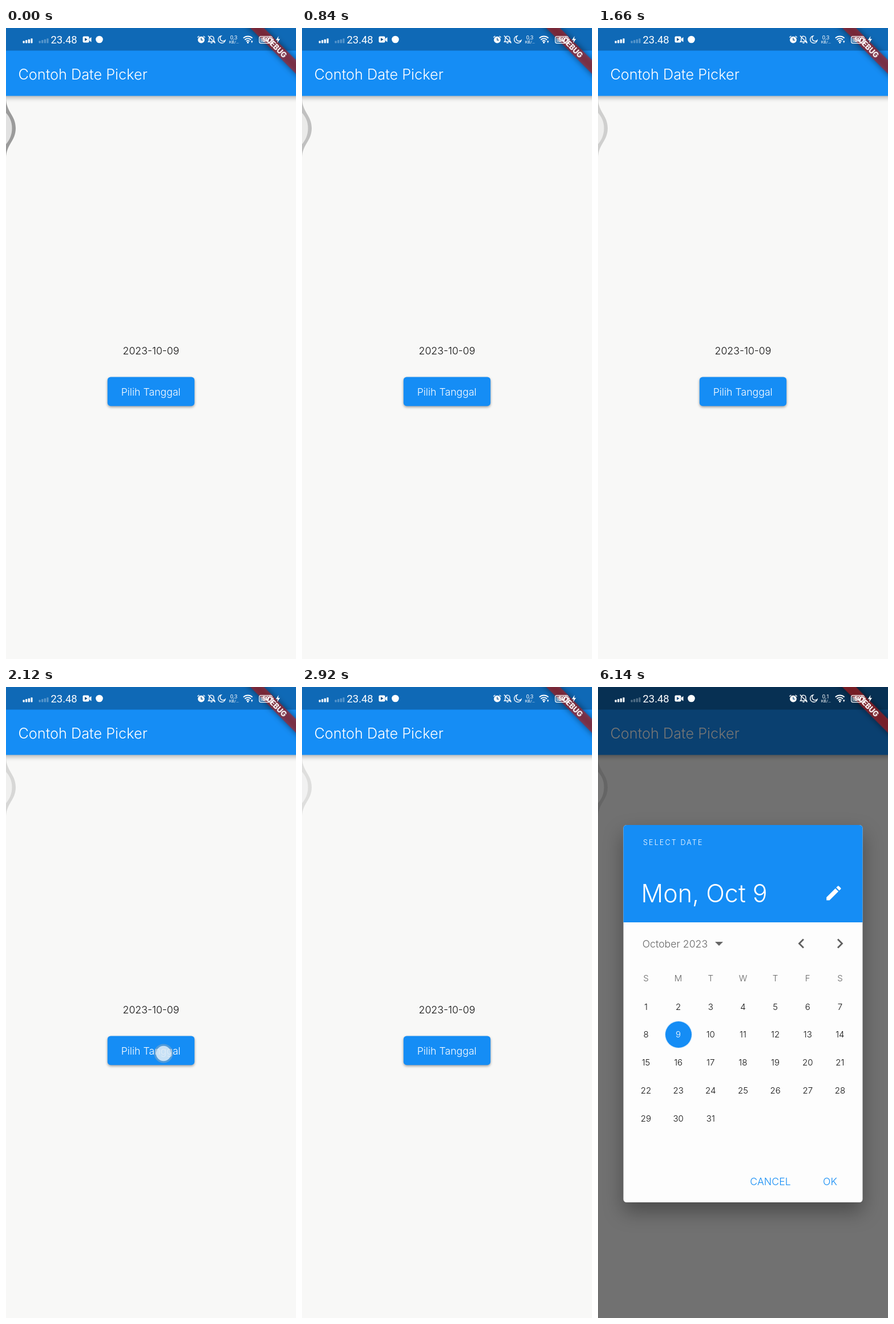
Recreate the animation shown at these times as an HTML page. Size 508 by 1102 pixels, loop 8 s.

```html
<!DOCTYPE html>
<html lang="id">
<head>
<meta charset="utf-8">
<title>Contoh Date Picker</title>
<style>
  html, body { margin: 0; width: 100%; height: 100%; overflow: hidden; background: #f8f8f7; }
  svg { display: block; width: 100vw; height: 100vh; }
  text { font-family: Inter, Roboto, sans-serif; font-weight: 350; font-optical-sizing: none; }
  .status text { font-family: Roboto, sans-serif; font-weight: 400; }
  .status .level { font-weight: 600; }
  .ribbon text { font-weight: 800; }
  .mid { text-anchor: middle; }
  .blue { fill: #158df5; }
  .grey { fill: #666; }
  .button { filter: drop-shadow(0 2px 2px rgba(0, 0, 0, .36)); }
  .bar { filter: drop-shadow(0 3px 4px rgba(0, 0, 0, .3)); }
  .card { filter: drop-shadow(0 16px 17px rgba(0, 0, 0, .34)); }
  .glow { filter: blur(5.6px); }

  .wave { animation: fade 8s linear infinite; }
  .touch { animation: tap 8s step-end infinite; }
  .dialog, .scrim { animation: open 8s step-end infinite; }
  .fast { animation: fast 8s step-end infinite; }
  .slow { animation: slow 8s step-end infinite; }

  @keyframes fade {
    0% { opacity: .37; }
    5.5% { opacity: .25; }
    15.5% { opacity: .19; }
    26.5% { opacity: .13; }
    36.5%, 100% { opacity: .1; }
  }
  @keyframes tap {
    0%, 100% { opacity: 0; }
    21% { opacity: 1; }
    28.5% { opacity: 0; }
  }
  @keyframes open {
    0% { opacity: 0; }
    71.75%, 100% { opacity: 1; }
  }
  @keyframes fast {
    0% { opacity: 1; }
    76.75%, 100% { opacity: 0; }
  }
  @keyframes slow {
    0% { opacity: 0; }
    76.75%, 100% { opacity: 1; }
  }
</style>
</head>
<body>
<svg viewBox="0 0 508 1102" preserveAspectRatio="none">
  <rect width="508" height="1102" fill="#f8f8f7"/>

  <!-- Page -->
  <rect class="blue bar" x="-12" y="0" width="532" height="118.6"/>
  <rect width="508" height="39.5" fill="#0f69b6"/>
  <text x="21.4" y="89.5" font-size="25.3" fill="#fff">Contoh Date Picker</text>
  <text class="mid" x="254" y="569.5" font-size="17.7" fill="#111">2023-10-09</text>
  <rect class="blue button" x="177.8" y="609.4" width="152.4" height="50.8" rx="5.6"/>
  <text class="mid" x="253.7" y="642" font-size="17.7" fill="#fff">Pilih Tanggal</text>

  <rect class="scrim" width="508" height="1102" fill="#000" fill-opacity=".54"/>

  <!-- Date picker -->
  <g class="dialog">
    <rect class="card" x="44.5" y="241" width="419" height="659" rx="5.5" fill="#fdfdfd"/>
    <path class="blue" d="M44.5 411V246.5a5.5 5.5 0 0 1 5.5-5.5H458a5.5 5.5 0 0 1 5.5 5.5V411z"/>
    <text x="79" y="276" font-size="12.6" letter-spacing="2.1" fill="#fff">SELECT DATE</text>
    <text x="75.5" y="376" font-size="43" fill="#fff">Mon, Oct 9</text>
    <path transform="translate(396 343) scale(1.41)" fill="#fff"
      d="M3 17.25V21h3.75L17.81 9.94l-3.75-3.75zM20.71 7.04a1 1 0 0 0 0-1.41l-2.34-2.34a1 1 0 0 0-1.41 0l-1.83 1.83 3.75 3.75z"/>
    <text class="grey" x="77.7" y="455" font-size="17.7">October 2023</text>
    <path class="grey" d="M205 445H219L212 452z"/>
    <g fill="none" stroke="#5f5f5f" stroke-width="2.8">
      <path d="M360 440.5L352.5 448L360 455.5"/>
      <path d="M420 440.5L427.5 448L420 455.5"/>
    </g>
    <circle cx="141" cy="607" r="24.3" fill="#dceefd"/>
    <circle class="blue" cx="141" cy="607" r="23"/>
    <g id="days" class="mid" font-size="15.1"></g>
    <g class="blue mid" font-size="17.7">
      <text x="302" y="870.3">CANCEL</text>
      <text x="406.5" y="870.3">OK</text>
    </g>
  </g>

  <!-- Debug ribbon -->
  <g class="ribbon" transform="translate(508 0) rotate(45)">
    <rect class="glow" x="-90" y="39.6" width="180" height="17" fill-opacity=".5"/>
    <rect x="-70" y="39.6" width="140" height="17" fill="#b71c1c" fill-opacity=".63"/>
    <text class="mid" y="52.8" font-size="12.8" fill="#fff">DEBUG</text>
  </g>

  <!-- Edge panel -->
  <g class="wave">
    <path d="M0 122C0 147 17 152 17 175S0 203 0 228z" fill="#000"/>
    <path d="M0 148C6 155 10.5 163 10.5 175S6 196 0 203z" fill="#bcbcbc"/>
  </g>

  <!-- Status bar -->
  <g class="status" fill="#fff">
    <g id="signal"></g>
    <text x="78.5" y="27" font-size="18.4">23.48</text>
    <rect x="134.5" y="14.5" width="11" height="11" rx="2"/>
    <path d="M146 18.5L149.5 16V24.5L146 22z"/>
    <path d="M138 17.3L142.8 20L138 22.7z" fill="#0f4f86"/>
    <circle cx="163.5" cy="20" r="6.3"/>

    <circle cx="342" cy="20.7" r="5.9"/>
    <path d="M335.3 16.6L338.4 14.1M348.7 16.6L345.6 14.1" stroke="#fff" stroke-width="1.3"/>
    <path d="M342 17.2V21.2H345" fill="none" stroke="#0f4f86" stroke-width="1.3"/>

    <g fill="none" stroke="#fff" stroke-width="1.4">
      <path d="M354.5 24H365.5L364 22V18.5C364 14.5 361.5 14.5 360 14.3C358 14.5 356 15.5 356 18.5V22zM358.5 26.3H361.5M354 13.5L366.5 26.5"/>
      <path d="M376.8 14A6.2 6.2 0 1 0 384 21.6A5.2 5.2 0 0 1 376.8 14z"/>
    </g>

    <g class="mid">
      <text class="fast" x="399" y="20" font-size="9.5">0,3</text>
      <text class="slow" x="399" y="20" font-size="9.5">0,1</text>
      <text x="399.3" y="27" font-size="7.4">KB/…</text>
    </g>

    <path fill="none" stroke="#fff" stroke-width="1.9"
      d="M415.8 17.6A11.5 11.5 0 0 1 431.6 17.6M418.3 20.6A7.7 7.7 0 0 1 429.1 20.6M420.8 23.3A4.3 4.3 0 0 1 426.6 23.3"/>
    <circle cx="423.7" cy="25.3" r="1.6"/>
    <path d="M429 22.5H432.5L430.7 26.5z"/>

    <rect x="443.6" y="14.6" width="22.5" height="12" rx="3" fill="none" stroke="#fff" stroke-width="1.2"/>
    <rect x="445.4" y="16.4" width="11" height="8.4" rx="1.4" opacity=".5"/>
    <rect x="467" y="18.5" width="1.6" height="4" rx=".8"/>
    <text class="mid level" x="455" y="24.4" font-size="10.5">50</text>
    <path d="M477.6 14L472.8 21.2H476L474.8 26.5L480 18.9H476.7z"/>
  </g>

  <g class="touch">
    <circle cx="276" cy="640" r="16.5" fill="#8fa9bd" fill-opacity=".5"/>
    <circle cx="276" cy="640" r="13.2" fill="#e6f2fc" fill-opacity=".8"/>
  </g>
</svg>
<script>
  const NS = "http://www.w3.org/2000/svg";

  function add(parent, tag, attrs, label = "") {
    const node = document.createElementNS(NS, tag);
    for (const key in attrs) node.setAttribute(key, attrs[key]);
    node.textContent = label;
    parent.append(node);
  }

  const days = document.getElementById("days");
  const column = i => 84 + 56.65 * i;
  [..."SMTWTFS"].forEach((name, i) =>
    add(days, "text", { x: column(i), y: 514.3, fill: "#666" }, name));

  for (let d = 1; d <= 31; d++) {
    const i = d - 1;
    add(days, "text", {
      x: column(i % 7),
      y: 563.5 + 48.9 * Math.floor(i / 7),
      fill: d === 9 ? "#fff" : "#111"
    }, d);
  }

  // Two signal meters, the second one idle.
  const signal = document.getElementById("signal");
  [[29.5, 1], [57.5, .3]].forEach(([left, opacity]) => {
    for (let i = 0; i < 4; i++) {
      const height = 4 + 1.4 * i;
      add(signal, "rect", { x: left + 4.6 * i, y: 26.5 - height, width: 3.2, height, rx: .8, opacity });
    }
  });
</script>
</body>
</html>
```
